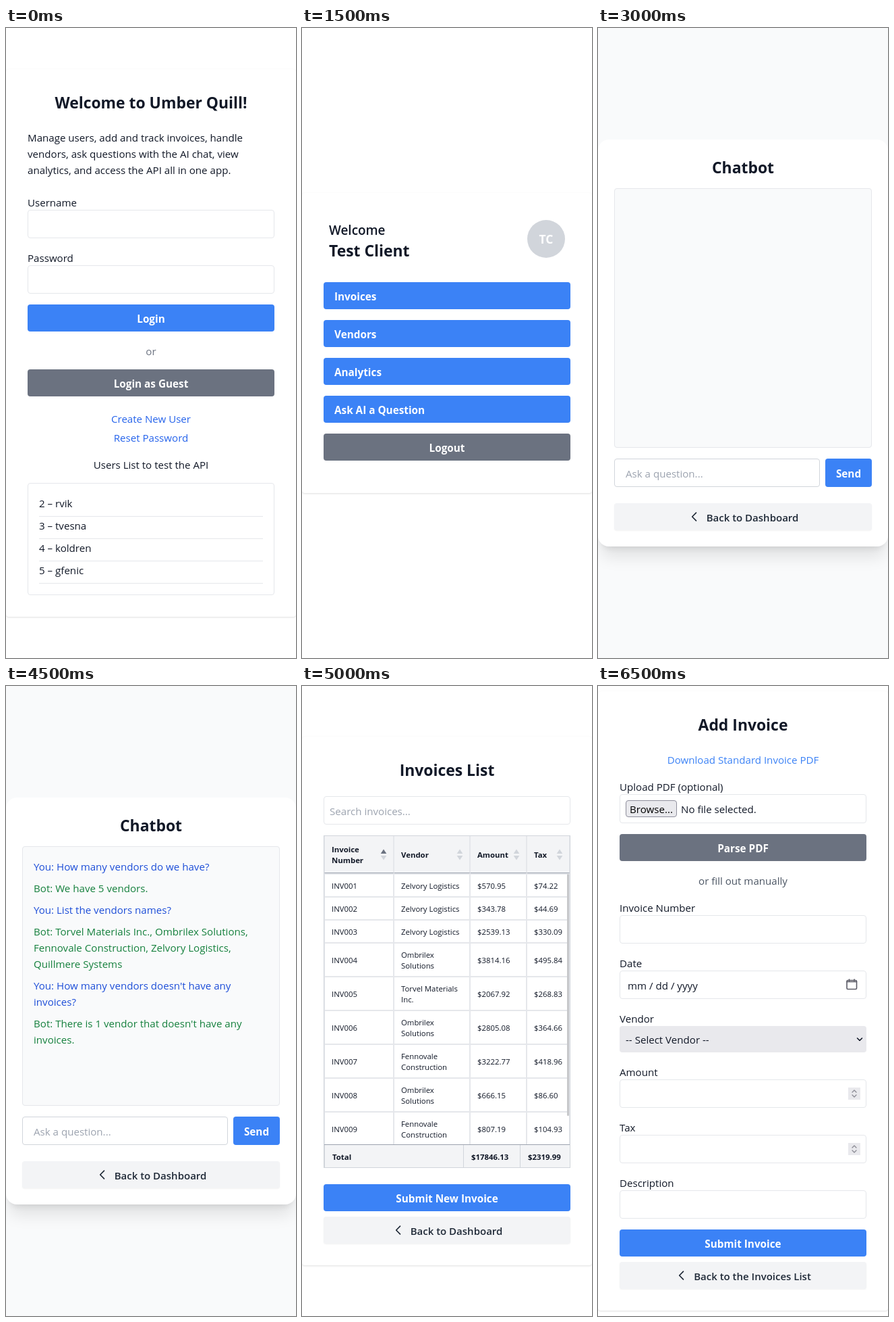
An HTML page for the animation above (8000 ms loop, 430x932 px).

```html
<!DOCTYPE html>
<html lang="en">
<head>
<meta charset="utf-8">
<title>Invoice app tour</title>
<style>
* { box-sizing: border-box; margin: 0; }
html, body { width: 100%; height: 100%; overflow: hidden; background: #fff; }
body {
  position: relative;
  font: 15.1px/24px "Open Sans", "Noto Sans", sans-serif;
  color: #111827;
  white-space: nowrap;
}

/* Screens */
.screen {
  position: absolute; left: 0; top: 0; width: 430px; height: 932px;
  overflow: hidden; visibility: hidden;
  animation: 8s step-end infinite;
}
#login { animation-name: login; }
#home { animation-name: home; }
#chat { animation-name: chat; background: #f9fafb; }
#list { animation-name: list; }
#form { animation-name: form; }
@keyframes login { 0% { visibility: visible } 18.75%, 100% { visibility: hidden } }
@keyframes home { 0% { visibility: hidden } 18.75% { visibility: visible } 37.5%, 100% { visibility: hidden } }
@keyframes chat { 0% { visibility: hidden } 37.5% { visibility: visible } 62.5%, 100% { visibility: hidden } }
@keyframes list { 0% { visibility: hidden } 62.5% { visibility: visible } 81.25%, 100% { visibility: hidden } }
@keyframes form { 0% { visibility: hidden } 81.25%, 100% { visibility: visible } }

.turn { opacity: 0; animation: 8s step-end infinite; }
.turn:nth-of-type(1) { animation-name: turn1; }
.turn:nth-of-type(2) { animation-name: turn2; }
.turn:nth-of-type(3) { animation-name: turn3; }
@keyframes turn1 { 0% { opacity: 0 } 43.75%, 100% { opacity: 1 } }
@keyframes turn2 { 0% { opacity: 0 } 50%, 100% { opacity: 1 } }
@keyframes turn3 { 0% { opacity: 0 } 56.25%, 100% { opacity: 1 } }

/* Parts */
.card, .screen > p, h1, .field, .btn, .back { position: absolute; }
.card {
  left: 0; width: 430px; background: #fff; border-radius: 4px;
  box-shadow: 0 1px 3px rgb(0 0 0 / .1), 0 1px 2px -1px rgb(0 0 0 / .1);
}
.screen > p { left: 32px; margin-top: 1px; }
.screen > .mid { left: 0; width: 430px; text-align: center; }
h1 {
  left: 0; width: 430px; margin-top: 2px; text-align: center;
  font-size: 22.9px; line-height: 32px; font-weight: 700;
}
.field {
  left: 32px; width: 366px; height: 42px; line-height: 42px; padding-left: 8px;
  border: 1px solid #e5e7eb; border-radius: 4px; background: #fff;
}
.hint { color: #9ca3af; }
.btn {
  left: 32px; width: 366px; height: 40px; line-height: 42px; border-radius: 4px;
  background: #3b82f6; color: #fff; text-align: center;
  font-size: 15.3px; font-weight: 700;
}
.gray { background: #6b7280; }
.start { text-align: left; padding-left: 16px; }
.back {
  left: 32px; width: 366px; height: 40px; border-radius: 4px;
  display: flex; align-items: center; justify-content: center; gap: 8px;
  background: #f3f4f6; color: #1f2937; font-size: 15px; font-weight: 600;
  box-shadow: 0 1px 2px rgb(0 0 0 / .05);
}
.back span { position: relative; top: 1px; }
svg { fill: none; stroke: currentColor; stroke-width: 2; stroke-linecap: round; stroke-linejoin: round; }
.back svg { width: 20px; height: 20px; }

/* Login */
.users { height: 166px; padding: 16px; }
.users p { height: 33px; line-height: 26px; border-bottom: 1px solid #e5e7eb; }

/* Home */
.avatar {
  position: absolute; left: 334px; top: 284px; width: 56px; height: 56px;
  border-radius: 50%; background: #d1d5db; color: #fff;
  text-align: center; font-size: 17.4px; font-weight: 700; line-height: 57px;
}

/* Chat */
#chat .card { border-radius: 16px; box-shadow: 0 20px 25px -5px rgb(0 0 0 / .1), 0 8px 10px -6px rgb(0 0 0 / .1); }
#chat .back { left: 24px; width: 382px; }
.log { left: 24px; top: 237px; width: 382px; height: 384px; padding: 17px 16px; line-height: 24px; background: #f9fafb; }
.log p { margin-bottom: 8px; color: #15803d; }
.log .you { color: #1d4ed8; }

/* Invoice list */
.grid {
  position: absolute; left: 32px; top: 221px; width: 366px; height: 492px;
  overflow: hidden; border: 1px solid #d1d5db;
  font-size: 11.35px; line-height: 16px;
}
.row { display: grid; grid-template-columns: 104px 113px 84px 63px; }
.row div {
  position: relative; display: flex; align-items: center; padding: 9px 0 7px 10px;
  border: solid #e5e7eb; border-width: 0 2px 2px 0;
}
.row div:first-child { border-left-width: 1px; }
.row div:last-child { border-right-width: 1px; }
.head, .foot { background: #f3f4f6; font-weight: 700; font-size: 11.4px; }
.head { height: 57px; border-bottom: 2px solid #e5e7eb; }
.head div { border-bottom: 1px solid #9ca3af; }
.head svg { position: absolute; right: 9px; top: 19px; width: 10px; height: 17px; stroke: none; fill: #d1d5db; }
.head div:first-child path:first-child { fill: #6b7280; }
.row.foot {
  position: absolute; left: 0; top: 456px; width: 364px; height: 34px;
  grid-template-columns: 207px 84px 73px; border-top: 1px solid #9ca3af;
}
.foot div { padding: 3px 0 0 11px; border-color: #d1d5db; border-width: 0 1px 0 0; }
.foot div:last-child { border: 0; }
.bar { position: absolute; left: 360px; top: 56px; width: 3px; height: 358px; border-radius: 2px; background: #c6c7ca; }

/* Invoice form */
.pick {
  position: absolute; left: 8px; top: 8px; width: 76px; height: 25px; line-height: 25px;
  text-align: center; color: #000; background: #e9e9ed; border: 1px solid #8f8f9d; border-radius: 4px;
}
.select { height: 39px; line-height: 41px; padding-left: 9px; border: 0; background: #e9e9ed; }
.field svg { position: absolute; }
.spin { left: 338px; top: 11px; width: 18px; height: 18px; background: #e9e9ed; color: #8b8b94; stroke-width: 1.3; }
</style>
</head>
<body>
<svg width="0" height="0" style="position:absolute">
  <symbol id="prev" viewBox="0 0 24 24"><path d="M15 19l-7-7 7-7"/></symbol>
  <symbol id="step" viewBox="0 0 18 18"><path d="M6 7l3-3 3 3M6 11l3 3 3-3"/></symbol>
</svg>

<section class="screen" id="login">
  <div class="card" style="top:61px;height:810px"></div>
  <h1 style="top:93px">Welcome to Umber Quill!</h1>
  <p style="top:149px">Manage users, add and track invoices, handle<br>vendors, ask questions with the AI chat, view<br>analytics, and access the API all in one app.</p>
  <p style="top:245px">Username</p>
  <div class="field" style="top:269px"></div>
  <p style="top:327px">Password</p>
  <div class="field" style="top:351px"></div>
  <div class="btn" style="top:409px">Login</div>
  <p class="mid" style="top:465px;color:#6b7280">or</p>
  <div class="btn gray" style="top:505px">Login as Guest</div>
  <p class="mid" style="top:565px;color:#2563eb">Create New User</p>
  <p class="mid" style="top:593px;color:#2563eb">Reset Password</p>
  <p class="mid" style="top:633px">Users List to test the API</p>
  <div class="field users" style="top:673px">
    <p>2 – rvik</p>
    <p>3 – tvesna</p>
    <p>4 – koldren</p>
    <p>5 – gfenic</p>
  </div>
</section>

<section class="screen" id="home">
  <div class="card" style="top:244px;height:444px"></div>
  <p style="left:40px;top:284px;font-size:18.9px;line-height:28px;font-weight:600">Welcome</p>
  <h1 style="left:40px;top:312px;text-align:left">Test Client</h1>
  <div class="avatar">TC</div>
  <div class="btn start" style="top:376px">Invoices</div>
  <div class="btn start" style="top:432px">Vendors</div>
  <div class="btn start" style="top:488px">Analytics</div>
  <div class="btn start" style="top:544px">Ask AI a Question</div>
  <div class="btn gray" style="top:600px">Logout</div>
</section>

<section class="screen" id="chat">
  <div class="card" style="top:165px;height:602px"></div>
  <h1 style="top:189px">Chatbot</h1>
  <div class="field log">
    <div class="turn">
      <p class="you">You: How many vendors do we have?</p>
      <p>Bot: We have 5 vendors.</p>
    </div>
    <div class="turn">
      <p class="you">You: List the vendors names?</p>
      <p>Bot: Torvel Materials Inc., Ombrilex Solutions,<br>Fennovale Construction, Zelvory Logistics,<br>Quillmere Systems</p>
    </div>
    <div class="turn">
      <p class="you">You: How many vendors doesn't have any<br>invoices?</p>
      <p>Bot: There is 1 vendor that doesn't have any<br>invoices.</p>
    </div>
  </div>
  <div class="field hint" style="left:24px;top:637px;width:305px;padding-left:16px;border-color:#d1d5db">Ask a question...</div>
  <div class="btn" style="left:337px;top:637px;width:69px;height:42px;line-height:44px">Send</div>
  <div class="back" style="top:703px"><svg><use href="#prev"/></svg><span>Back to Dashboard</span></div>
</section>

<section class="screen" id="list">
  <div class="card" style="top:75px;height:782px"></div>
  <h1 style="top:107px">Invoices List</h1>
  <div class="field hint" style="top:163px">Search invoices...</div>
  <div class="grid">
    <div class="row head"></div>
    <div class="rows"></div>
    <div class="bar"></div>
    <div class="row foot"><div>Total</div><div>$17846.13</div><div>$2319.99</div></div>
  </div>
  <div class="btn" style="top:737px">Submit New Invoice</div>
  <div class="back" style="top:785px"><svg><use href="#prev"/></svg><span>Back to Dashboard</span></div>
</section>

<section class="screen" id="form">
  <div class="card" style="top:8px;height:916px"></div>
  <h1 style="top:40px">Add Invoice</h1>
  <p class="mid" style="top:96px;color:#3b82f6">Download Standard Invoice PDF</p>
  <p style="top:136px">Upload PDF (optional)</p>
  <div class="field" style="top:160px;height:43px;padding-left:90px;line-height:43px"><span class="pick">Browse...</span>No file selected.</div>
  <div class="btn gray" style="top:219px">Parse PDF</div>
  <p class="mid" style="top:275px;color:#4b5563">or fill out manually</p>
  <p style="top:315px">Invoice Number</p>
  <div class="field" style="top:339px"></div>
  <p style="top:397px">Date</p>
  <div class="field" style="top:421px;padding-left:11px">mm / dd / yyyy
    <svg style="left:335px;top:11px;color:#5b5b66;stroke-width:1.6" width="17" height="17"><rect x="1" y="2.5" width="14.5" height="13" rx="1.5"/><path d="M1 4.5h14.5M4.5 1v2M12 1v2"/></svg>
  </div>
  <p style="top:479px">Vendor</p>
  <div class="field select" style="top:503px">-- Select Vendor --
    <svg style="left:351px;top:16px;stroke-width:1.6" width="10" height="8"><path d="M1.5 2L5 5.5 8.5 2"/></svg>
  </div>
  <p style="top:558px">Amount</p>
  <div class="field" style="top:582px"><svg class="spin"><use href="#step"/></svg></div>
  <p style="top:640px">Tax</p>
  <div class="field" style="top:664px"><svg class="spin"><use href="#step"/></svg></div>
  <p style="top:722px">Description</p>
  <div class="field" style="top:746px"></div>
  <div class="btn" style="top:804px">Submit Invoice</div>
  <div class="back" style="top:852px"><svg><use href="#prev"/></svg><span>Back to the Invoices List</span></div>
</section>

<script>
const freight = "Zelvory Logistics";
const tech = "Ombrilex<br>Solutions";
const supply = "Torvel Materials<br>Inc.";
const build = "Fennovale<br>Construction";
const invoices = [
  [freight, "570.95", "74.22"],
  [freight, "343.78", "44.69"],
  [freight, "2539.13", "330.09"],
  [tech, "3814.16", "495.84"],
  [supply, "2067.92", "268.83"],
  [tech, "2805.08", "364.66"],
  [build, "3222.77", "418.96"],
  [tech, "666.15", "86.60"],
  [build, "807.19", "104.93"],
];
const sortIcon = '<svg viewBox="0 0 10 17"><path d="M.7 7L5 .5 9.3 7z"/><path d="M.7 10L5 16.5 9.3 10z"/></svg>';
const cell = (text, icon = "") => `<div><span>${text}</span>${icon}</div>`;

document.querySelector(".head").innerHTML =
  ["Invoice<br>Number", "Vendor", "Amount", "Tax"].map(text => cell(text, sortIcon)).join("");
document.querySelector(".rows").innerHTML = invoices.map(([vendor, amount, tax], i) => {
  const texts = ["INV00" + (i + 1), vendor, "$" + amount, "$" + tax];
  return `<div class="row">${texts.map(text => cell(text)).join("")}</div>`;
}).join("");
</script>
</body>
</html>
```
